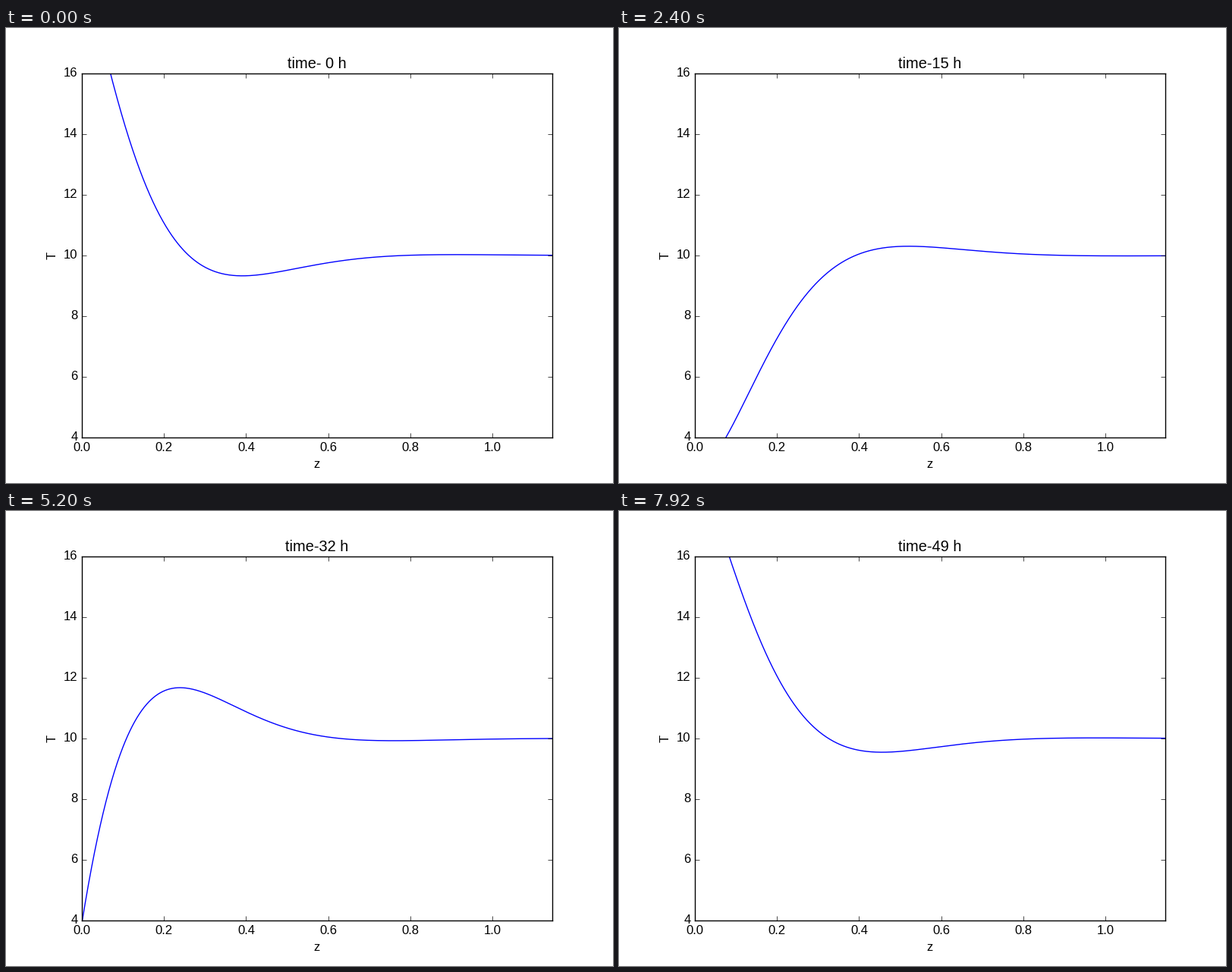
A matplotlib script for the animation above (8 s loop, 800x600 px).

```python
import numpy as np
import matplotlib.pyplot as plt
from matplotlib.animation import FuncAnimation

plt.style.use("classic")
plt.rcParams.update({
    "font.family": "Liberation Sans",
    "font.size": 12,
    "figure.facecolor": "white",
})

FRAMES, INTERVAL = 100, 80
HOURS_PER_FRAME = 0.5

# Daily temperature wave sinking into the ground
MEAN, AMPLITUDE = 10.0, 10.0
DIFFUSIVITY = 1e-6
OMEGA = 2 * np.pi / 86400
PHASE_HOURS = 18
DEPTH = np.sqrt(2 * DIFFUSIVITY / OMEGA)
Z_MAX = DEPTH * np.log(1000)

z = np.linspace(0, Z_MAX, 1000)


def temperature(hours):
    angle = OMEGA * 3600 * (hours - PHASE_HOURS) - z / DEPTH
    return MEAN + AMPLITUDE * np.exp(-z / DEPTH) * np.sin(angle)


fig = plt.figure(figsize=(8, 6), dpi=100)
ax = fig.add_subplot(111)
ax.set_xlim(0, Z_MAX)
ax.set_ylim(4, 16)
ax.set_xlabel("z")
ax.set_ylabel("T")
title = ax.set_title("")
line, = ax.plot(z, temperature(0), color="blue", lw=1)


def update(frame):
    hours = frame * HOURS_PER_FRAME
    line.set_ydata(temperature(hours))
    title.set_text(f"time-{int(hours):2d} h")
    return line, title


anim = FuncAnimation(fig, update, frames=FRAMES, interval=INTERVAL, repeat=True)
plt.show()
```
